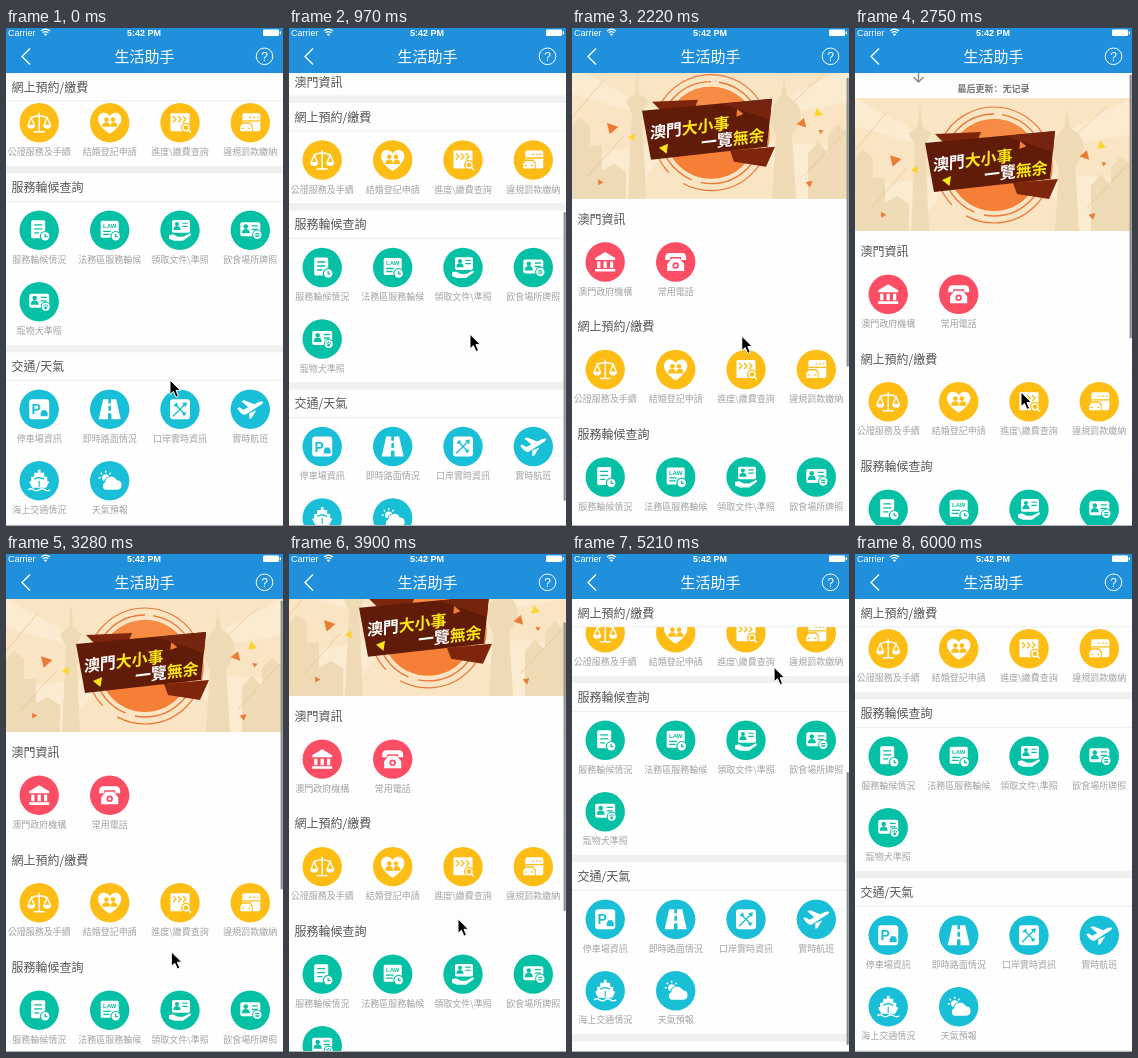
An HTML page for the animation above (6280 ms loop, 277 px wide and 498 px high).

```html
<!DOCTYPE html>
<html lang="zh-Hant">
<head>
<meta charset="utf-8">
<style>
html, body { margin: 0; width: 100%; height: 100%; overflow: hidden; background: #fff; }
svg { display: block; width: 100%; height: 100%; user-select: none; }
text { font-family: "Noto Sans CJK TC", "Noto Sans CJK SC", "Noto Sans CJK JP", "Noto Sans CJK", sans-serif; }
.latin { font-family: "Liberation Sans", sans-serif; }
.label { font-size: 9px; fill: #a2a2a2; text-anchor: middle; }
.head { font-size: 12px; fill: #555; font-weight: 300; }
.icon { fill: #fff; }
.icon .k { fill: currentColor; }
.icon .s { fill: none; stroke: #fff; stroke-width: 1.4; }
.icon .d { fill: none; stroke: currentColor; stroke-width: 1.3; }
.slogan { font-size: 16px; font-weight: 900; }
</style>
</head>
<body>
<svg id="stage" viewBox="0 0 277 498" preserveAspectRatio="none"></svg>
<script>
const LOOP = 6280, TOP = 45, VIEW = 453, TOTAL = 707;
const COLS = [33.2, 103.7, 174, 244.3];

const badge = '<circle class="k" cx="6" cy="6" r="5.4"/><circle cx="6" cy="6" r="4.2"/><path class="d" d="M6 3.7V6.4H8.2"/>';
const card = '<rect x="-10" y="-8" width="20" height="14" rx="2"/><circle class="k" cx="-4.5" cy="-3.7" r="2.3"/>' +
  '<path class="k" d="M-8.5 3q0-4.400 4-4.400t4 4.400z"/><path class="d" d="M1.500-4.500H7.5M1.500-1H7.5"/>';

const icons = {
  hall: '<path d="M-10-4L0-10L10-4V-2H-10ZM-8-.5h3.2v6.5h-3.2zM-1.6-.5h3.2v6.5h-3.2zM4.8-.5h3.2v6.5h-3.2zM-10 7h20v2.6h-20z"/>',
  phone: '<path d="M-10.500-4Q-10.500-9-6-9H6Q10.500-9 10.500-4V-2H5.500V-5H-5.500V-2H-10.500ZM-4-3.500H4L8.500 2V9H-8.500V2Z"/><circle class="k" cy="3.500" r="3.2"/><circle cy="3.500" r="1.5"/>',
  scales: '<path class="s" d="M0-10V9M-5.5 9H5.5M-8-5Q0-9 8-5M-11 2L-8-5L-5 2M5 2L8-5L11 2"/><path d="M-12 2h8a4 4 0 0 1-8 0zM4 2h8a4 4 0 0 1-8 0z"/>',
  heart: '<path d="M0 11C-17 0-12-10-6-10Q-2-10 0-6.5Q2-10 6-10C12-10 17 0 0 11Z"/>' +
    '<g class="k"><circle cx="-3.3" cy="-3.2" r="2.3"/><circle cx="3.3" cy="-3.2" r="2.3"/><path d="M-7.5 4q0-4.6 4-4.6T.2 4zM.6 4q0-4.6 3.6-4.6T7.5 4z"/></g>',
  progress: '<rect x="-9.5" y="-9.5" width="19" height="18" rx="1"/><path class="d" d="M-7-6.5l3 3-3 3M-2-6.5l3 3-3 3M3-6.5l3 3-3 3"/>' +
    '<circle class="k" cx="6" cy="5" r="5"/><circle class="s" cx="6" cy="5" r="3"/><path class="s" d="M8 7l3 3"/>',
  fine: '<rect x="-8" y="-9.5" width="18" height="18" rx="2"/><path class="d" d="M-1-5.5H1M3-5.5H5M6.500-5.5H8M-8-2H10"/>' +
    '<path class="k" d="M-11 3L-8.500-.5H0L2.500 3V9.500H-11Z"/><path d="M-10 4L-8 1H-.5L1.500 4V8.500H-10Z"/><path class="d" d="M-8.500 5.500H-6.500M-2 5.500H0"/>',
  queue: '<rect x="-8" y="-10" width="14" height="18" rx="1.5"/><path class="d" d="M-5-5.5H3M-5-1.5H3M-5 2.5H0"/>' + badge,
  law: '<rect x="-9" y="-9.5" width="18" height="17" rx="1.5"/><text class="k latin" y="-2.2" font-size="6" font-weight="700" text-anchor="middle">LAW</text>' +
    '<path class="d" d="M-6.5 1H1M-6.5 4H0"/>' + badge,
  hand: '<g transform="translate(1 -3) scale(.9)">' + card + '</g><path d="M-11 5l4-1 5 2.5h5l7-3.5q2 1 0 2.5l-7 5h-9l-5-2z"/>',
  food: card + '<circle class="k" cx="7" cy="4.5" r="5.2"/><circle cx="7" cy="4.5" r="4.2"/><path class="d" d="M5 3.3H9M5 5.7H9"/>',
  pet: card + '<circle class="k" cx="6.5" cy="5" r="5"/><circle cx="6.5" cy="5" r="4"/><g class="k"><circle cx="4.8" cy="4" r=".8"/><circle cx="6.5" cy="3" r=".8"/><circle cx="8.2" cy="4" r=".8"/><circle cx="6.5" cy="6.2" r="1.4"/></g>',
  park: '<rect x="-10" y="-10" width="20" height="20" rx="3"/><text class="k latin" x="-3" y="5" font-size="14" font-weight="700" text-anchor="middle">P</text>' +
    '<path class="k" d="M1.5 4L3 1H7L8.5 4V7H1.5Z"/>',
  road: '<path d="M-6.5-10H-1.2V-6H1.2V-10H6.5L11 10H1.6V5H-1.6V10H-11Z"/><path class="k" d="M-1-10H1L1.2-6H-1.2zM-1.2-3.5H1.2L1.4 1.5H-1.4zM-1.5 4H1.5L1.7 10H-1.7z"/>',
  border: '<rect x="-10" y="-10" width="20" height="20" rx="3"/><path class="d" d="M-7 7L6-6M-5-5L5 5"/><path class="k" d="M2-6L7-7L6-2ZM-7-3l4-4 1 4zM2 4l5-1-3 4z"/>',
  plane: '<path d="M-13-1l2-1 4 2.5 5-2.5-7-6 3-1 10 4 5-2.5q4-1 4 .5-1 2-4 3.5L-5 5.5Q-9 6-13-1ZM-1 4l7-3-5 8-2 .5z"/>',
  ship: '<path d="M-1.3-11H1.3V-8H5V-4H8V0L10 1 7 7H-7L-10 1-8 0V-4H-5V-8H-1.3Z"/><path class="k" d="M-5-2.5L0-4 5-2.5V-1L0-2.5-5-1zM-.6 0H.6V6H-.6z"/>' +
    '<path class="s" d="M-11 9q2.75-2 5.5 0t5.5 0 5.5 0 5.5 0"/>',
  weather: '<circle cx="-4" cy="-3" r="3.6"/><path class="s" d="M-4-10V-8M-11-3H-9M-9-8L-7.6-6.6M1-8L-.4-6.6"/>' +
    '<path class="k" d="M-9 9q-3-6 3-8 3-8 10-4 4 2 4 5 6 2 4 7z"/><path d="M-4 9a4 4 0 0 1-.5-7.5A6 6 0 0 1 7-.5 4.8 4.8 0 0 1 8 9Z"/>'
};

const sections = [
  { y: 0, name: '澳門資訊', color: '#fb4d64', items: [['hall', '澳門政府機構'], ['phone', '常用電話']] },
  { y: 107.5, name: '網上預約/繳費', color: '#fdbd14', items: [['scales', '公證服務及手續'], ['heart', '結婚登記申請'], ['progress', '進度\\繳費查詢'], ['fine', '違規罰款繳納']] },
  { y: 215, name: '服務輪候查詢', color: '#05c0a5', items: [['queue', '服務輪候情況'], ['law', '法務區服務輪候'], ['hand', '領取文件\\準照'], ['food', '飲食場所牌照'], ['pet', '寵物犬準照']] },
  { y: 394, name: '交通/天氣', color: '#19bfd6', items: [['park', '停車場資訊'], ['road', '即時路面情況'], ['border', '口岸實時資訊'], ['plane', '實時航班'], ['ship', '海上交通情況'], ['weather', '天氣預報']] }
];
const END = 573;
const sectionEnd = i => i < 3 ? sections[i + 1].y : END;

function cell([icon, label], i, color) {
  const x = COLS[i % 4], y = 56.8 + 71.5 * Math.floor(i / 4);
  return `<g transform="translate(${x} ${y})"><circle r="19.7" fill="${color}"/><g class="icon" color="${color}">${icons[icon]}</g>` +
    `<text class="label" y="32.6">${label}</text></g>`;
}

function sectionBody(s, i) {
  const h = sectionEnd(i) - s.y;
  return `<g transform="translate(0 ${s.y})"><rect class="fade" y="${h - 7.5}" width="277" height="7.5" fill="#f0f0f0"/>` +
    s.items.map((item, n) => cell(item, n, s.color)).join('') + '</g>';
}

const tri = (x, y, r, turn, fill) =>
  `<path transform="translate(${x} ${y}) rotate(${turn}) scale(${r})" d="M-1-.8L1-.5L-.2 1Z" fill="${fill}"/>`;

const banner = `
  <rect width="277" height="133" fill="#f9e5c4"/>
  <g fill="#fbebd0"><path d="M0 0L110 60 0 28ZM277 0L170 55 277 36ZM0 133V92L100 75 60 133ZM277 133V80L180 75 225 133Z"/></g>
  <g fill="#eedab5">
    <path d="M65 4L67 28 76 35 72 44 70 47 74 133H56L60 47 58 44 54 35 63 28Z"/>
    <path d="M212 12L215 30Q233 40 227 58L220 70 224 133H200L204 70Q190 48 209 30Z"/>
    <path d="M0 60L8 52 18 60V80H30V133H0ZM236 133V88L246 76 256 88V70L266 58 277 70V133ZM28 133V106L42 98 54 106V133Z"/>
  </g>
  <path d="M0 52L32 14M14 112L52 70M222 36L252 8M232 110L277 62" fill="none" stroke="#e9b98a" stroke-width=".6"/>
  <g fill="none" stroke="#ee7737"><circle cx="139" cy="67" r="58" stroke-width="1.2" stroke-dasharray="120 18 60 12"/>
    <circle cx="139" cy="67" r="51" stroke-width="1.4" stroke-dasharray="90 10 140 8"/></g>
  <circle cx="139" cy="67" r="46" fill="#f57f36"/>
  <path d="M106 35A46 46 0 0 1 176 40L125 88Z" fill="#f78b43"/>
  <path d="M80 36L126 34 122 44 92 48ZM158 85L203 81 194 101 162 96Z" fill="#7d260c"/>
  <path d="M70 45L200 33 195 81 79 94Z" fill="#611c09"/>
  <path d="M150 38L200 33 198 54Z" fill="#75240d"/>
  <g class="slogan" fill="#fff">
    <text transform="translate(78 73) rotate(-7) skewX(-8)">澳門<tspan fill="#ffe714">大小事</tspan></text>
    <text transform="translate(129 83) rotate(-7) skewX(-8)">一覽<tspan fill="#ffe714">無余</tspan></text>
  </g>` +
  tri(40, 63, 6, 10, '#ee7b34') + tri(60, 72, 4, 80, '#fbd52a') + tri(230, 57, 5, 190, '#ee7b34') +
  tri(246, 48, 4.5, 40, '#fbd52a') + tri(28, 117, 3, 20, '#ee7b34') + tri(237, 118, 3.5, 100, '#ee7b34') +
  tri(92, 83, 5, 90, '#ffe714') + tri(249, 66, 2.5, 0, '#ee7b34') + tri(167, 48, 4, 30, '#f57f36');

const pull = `
  <text x="138.5" y="-6.5" font-size="9" font-weight="700" fill="#777" text-anchor="middle" lang="zh-Hans">最后更新：无记录</text>
  <path d="M63.5-38V-16M58.5-21L63.5-16 68.5-21" fill="none" stroke="#8c8c8c" stroke-width="1.5"/>`;

const nav = `
  <rect width="277" height="45" fill="#2090dc"/>
  <g fill="#fff">
    <text class="latin" x="2" y="7.6" font-size="9">Carrier</text>
    <text class="latin" x="138" y="7.6" font-size="9" font-weight="700" text-anchor="middle">5:42 PM</text>
    <text x="138.5" y="34" font-size="15" text-anchor="middle">生活助手</text>
    <rect x="257" y="1.5" width="16" height="6.5" rx="1.2"/><rect x="273.7" y="3.3" width="1.3" height="3" rx=".6"/>
    <text class="latin" x="258.5" y="32.5" font-size="12" text-anchor="middle">?</text>
    <path d="M37.8 6.3L39.5 8 41.2 6.3Q39.5 4.8 37.8 6.3Z"/>
  </g>
  <g fill="none" stroke="#fff" stroke-width="1.3">
    <path d="M24 20.5L16 28.5 24 36.5"/><circle cx="258.5" cy="28.3" r="8.3" stroke-width="1"/>
    <path d="M36.7 4.8Q39.5 2.4 42.3 4.8M35 3Q39.5-.8 44 3" stroke-width="1.1"/>
  </g>`;

const header = s => `<g class="header"><rect width="277" height="28" fill="#fefefe"/>
  <path class="fade" d="M0 27.75H277" stroke="#e6e6e6" stroke-width=".7"/><text class="head" x="5.5" y="18.5">${s.name}</text></g>`;

const stage = document.getElementById('stage');
stage.innerHTML = `<rect width="277" height="498" fill="#fefefe"/>
  <g id="banner">${pull}${banner}<rect class="fade" y="133" width="277" height="7" fill="#f0f0f0"/></g>
  <g id="list">${sections.map(sectionBody).join('')}</g>
  ${sections.map(header).join('')}
  <rect id="bar" x="274.6" width="2.2" rx="1.1" fill="#8c8c8c"/>
  <path d="M0 497.5H277" stroke="#b4b4b4"/>
  ${nav}
  <path id="cursor" d="M0 0V14.5L3.4 11.4 6 17.3 8.5 16.2 6 10.4H10.5Z" fill="#000" stroke="#fff" stroke-width="1"/>`;

const $ = id => document.getElementById(id);
const headers = [...stage.querySelectorAll('.header')];
const fades = [...stage.querySelectorAll('.fade')];
const clamp = (v, a, b) => Math.min(b, Math.max(a, v));
const move = (el, x, y) => el.setAttribute('transform', `translate(${x.toFixed(2)} ${y.toFixed(2)})`);

// Keys: [time, centre of the first section title]
const scrollKeys = [[0, -56], [770, -56], [970, -19], [1300, 72], [1770, 145], [2150, 190], [2250, 191], [2750, 223],
  [2860, 224], [3250, 198], [3520, 198], [3900, 162], [4600, 16.5], [4860, -38], [5150, -71], [5350, -73], [5800, -57], [6000, -56]];
// Keys: [time, x, y]
const cursorKeys = [[0, 164, 352], [300, 163, 397], [700, 180, 256], [790, 180, 269], [970, 181, 306], [1300, 182, 396],
  [1770, 175, 397], [2200, 170, 308], [2750, 166, 364], [2950, 166, 385], [3500, 165, 401], [3900, 169, 365],
  [4600, 189, 218], [4860, 194, 164], [5150, 200, 112], [5570, 225, 150], [5850, 290, 190]];

// Monotone cubic through the keys
function track(keys, t, c = 1) {
  const last = keys.length - 1;
  if (t >= keys[last][0]) return keys[last][c];
  const i = keys.findIndex(k => k[0] > t) - 1;
  const slope = n => n < 0 || n >= last ? 0 : (keys[n + 1][c] - keys[n][c]) / (keys[n + 1][0] - keys[n][0]);
  const tangent = n => {
    const a = slope(n - 1), b = slope(n);
    return a * b <= 0 ? 0 : 2 * a * b / (a + b);
  };
  const h = keys[i + 1][0] - keys[i][0], u = (t - keys[i][0]) / h, v = 1 - u;
  return v * v * (1 + 2 * u) * keys[i][c] + u * u * (3 - 2 * u) * keys[i + 1][c] +
    h * u * v * (v * tangent(i) - u * tangent(i + 1));
}

function draw(t) {
  const title = track(scrollKeys, t), top = title - 13.5, bannerY = title - 153;
  move($('banner'), 0, bannerY);
  move($('list'), 0, top);
  headers.forEach((el, i) => {
    const y = top + sections[i].y;
    move(el, 0, Math.min(Math.max(y, TOP), top + sectionEnd(i) - 35));
  });

  const shade = 1 - .9 * clamp((title - 40) / 30, 0, 1);
  fades.forEach(el => el.setAttribute('opacity', shade));

  const offset = TOP - bannerY, max = TOTAL - VIEW;
  const over = Math.max(-offset, offset - max, 0);
  const size = 289 - over;
  const barY = clamp(TOP + offset * VIEW / TOTAL, TOP + 1.5, 496.5 - size);
  $('bar').setAttribute('y', barY);
  $('bar').setAttribute('height', size);
  $('bar').setAttribute('opacity', Math.min(clamp((t - 770) / 60, 0, 1), clamp((5950 - t) / 250, 0, 1)));

  move($('cursor'), track(cursorKeys, t, 1), track(cursorKeys, t, 2));
}

const start = performance.now();
function tick() {
  draw((performance.now() - start) % LOOP);
  requestAnimationFrame(tick);
}
draw(0);
requestAnimationFrame(tick);
</script>
</body>
</html>
```
